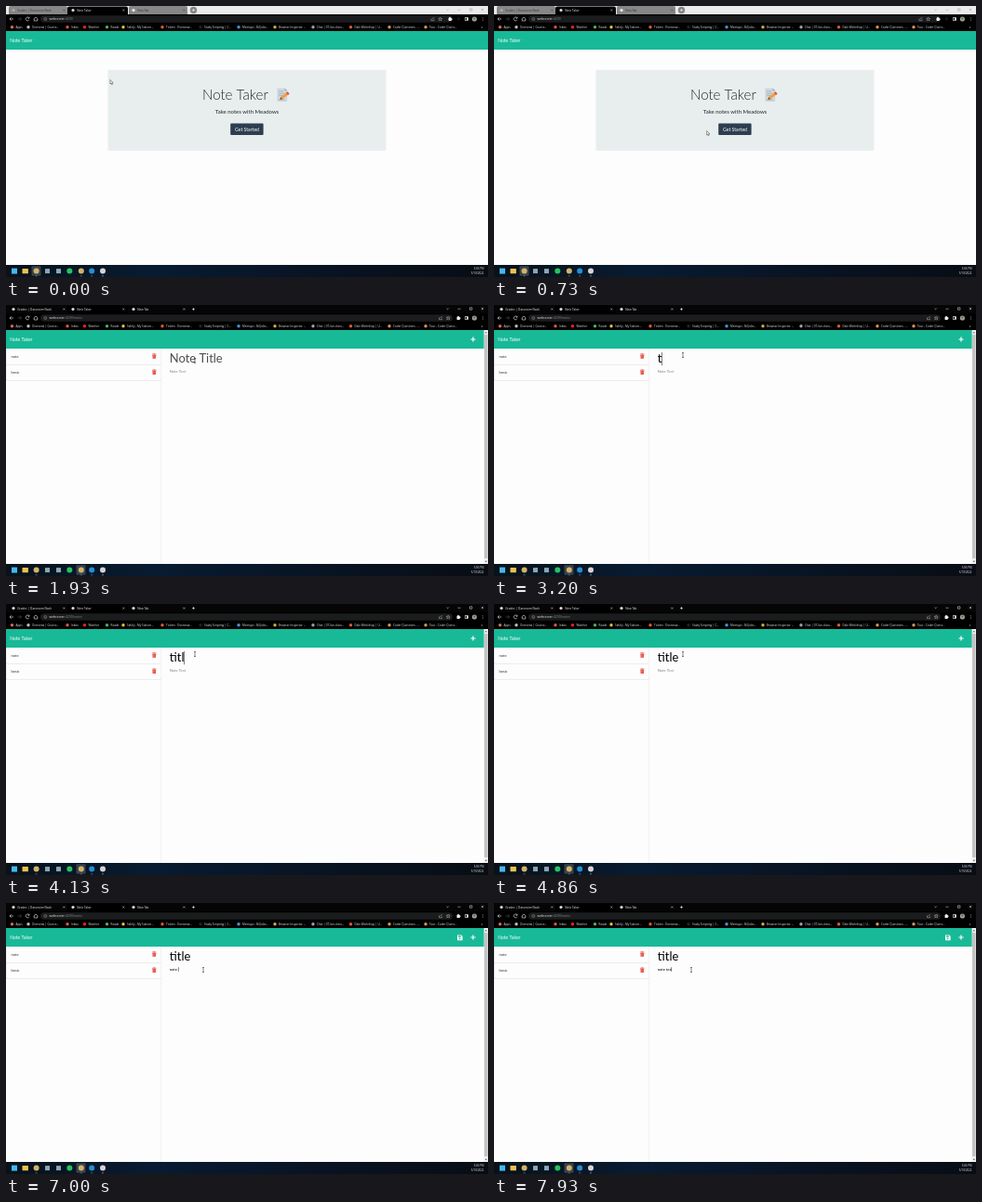
Animation, 518 px wide and 292 px high, one loop 8000 ms. Source, as an HTML page with a canvas:

```html
<!DOCTYPE html>
<html lang="en">
<head>
<meta charset="utf-8">
<title>Note Taker</title>
<style>
html, body { margin: 0; width: 100%; height: 100%; overflow: hidden; background: #fdfdfd; }
canvas { display: block; width: 518px; height: 292px; }
</style>
</head>
<body>
<canvas></canvas>
<script>
const W = 518, H = 292, LOOP = 8000;
const canvas = document.querySelector('canvas');
const ctx = canvas.getContext('2d');
const scale = window.devicePixelRatio || 1;
canvas.width = W * scale;
canvas.height = H * scale;

const ACTIVATE = 1130, NAVIGATE = 1260;
const TITLE_FOCUS = 2660, TEXT_FOCUS = 5860;
const titleKeys = { text: 'title', times: [3130, 3460, 3700, 3930, 4330] };
const bodyKeys = { text: 'note tex', times: [6600, 6660, 6800, 6860, 7000, 7060, 7600, 7730] };

// Pointer path: time, x, y
const path = [
  [0, 112, 79.5], [60, 112, 79.5], [400, 165, 112], [730, 228.5, 134.5], [860, 245, 135],
  [1130, 252, 133], [1300, 247, 122], [1600, 218, 82], [1800, 205, 64], [1930, 203, 60],
  [2600, 203, 54], [5000, 203, 54], [5860, 212, 72], [LOOP, 212, 72]
];

const lato = (size, weight = 400) => `${weight} ${size}px Lato, sans-serif`;
const ui = size => `${size}px "Open Sans", sans-serif`;

function rect(x, y, w, h, color, radius = 0) {
  ctx.fillStyle = color;
  ctx.beginPath();
  ctx.roundRect(x, y, w, h, radius);
  ctx.fill();
}
function dot(x, y, r, color) {
  ctx.fillStyle = color;
  ctx.beginPath();
  ctx.arc(x, y, r, 0, 7);
  ctx.fill();
}
function stroke(d, color, width = 0.6) {
  ctx.strokeStyle = color;
  ctx.lineWidth = width;
  ctx.stroke(new Path2D(d));
}
function fill(d, color) {
  ctx.fillStyle = color;
  ctx.fill(new Path2D(d));
}
function text(string, x, y, font, color, align = 'left') {
  ctx.font = font;
  ctx.fillStyle = color;
  ctx.textAlign = align;
  ctx.fillText(string, x, y);
}
function at(x, y, draw) {
  ctx.save();
  ctx.translate(x, y);
  draw();
  ctx.restore();
}
const cross = (x, y, r, color) =>
  stroke(`M${x - r} ${y - r}l${2 * r} ${2 * r}m0 ${-2 * r}l${-2 * r} ${2 * r}`, color, 0.5);
const plus = (x, y, r, color, width) =>
  stroke(`M${x - r} ${y}h${2 * r}M${x} ${y - r}v${2 * r}`, color, width);

function drawTabs(active) {
  rect(0, 0, W, 10, active ? '#050505' : '#ebebeb');
  const ink = active ? '#eee' : '#333';
  const tabs = [['Grades | Classroom Nook', 3], ['Note Taker', 67], ['New Tab', 132]];
  tabs.forEach(([label, x], i) => {
    const current = i === 1;
    if (current) rect(x - 1, 0.5, 65, 9.5, '#000', [2, 2, 0, 0]);
    else if (!active) rect(x, 0, 63, 9, '#868686', [2, 2, 0, 0]);
    const color = current ? '#eee' : ink;
    dot(x + 5, 4.5, 1.6, active || current ? '#ddd' : i ? '#eee' : '#aaa');
    text(label, x + 9.3, 5.7, ui(3.05), color);
    cross(x + 59.3, 4.5, 0.9, color);
  });
  if (!active) dot(201.5, 4.5, 3.7, '#868686');
  plus(201.5, 4.5, 1.4, '#fff', 0.6);
  const control = active ? '#eee' : '#999';
  stroke('M473.5 3.5l1.2 1.2l1.2 -1.2M485.5 4.2h3M498.5 2.8h2.4v2.4h-2.4z', control, 0.5);
  cross(512, 4, 1.2, control);
}

function drawToolbar(active, notes) {
  rect(0, 9, W, 18, '#000');
  rect(37, 10.3, 443, 7.4, '#1b1c1e', 3.7);
  stroke('M8 14h-4m1.7 -1.7l-1.7 1.7l1.7 1.7', '#eee');
  stroke('M12.5 14h4m-1.7 -1.7l1.7 1.7l-1.7 1.7', '#555');
  stroke('M24.7 13a1.9 1.9 0 1 0 .1 1.8M25 11.7v1.5h-1.5', '#eee');
  stroke('M29.6 14l2.4 -2l2.4 2M30.3 14v2h3.4v-2', '#eee');
  stroke('M43.8 14a1.5 1.5 0 1 0 -3 0a1.5 1.5 0 1 0 3 0M42.3 13.7v1', '#bbb', 0.4);
  const host = 'webserver';
  text(host, 46.5, 15.3, ui(3.4), '#eee');
  const hostWidth = ctx.measureText(host).width;
  text(notes ? ':4200/notes' : ':4200', 46.5 + hostWidth, 15.3, ui(3.4), '#888');

  const shift = active ? 8.5 : 0;
  stroke(`M${457 + shift} 13.5v2.2h3v-1.3M${458 + shift} 14.3q.4 -1.5 2.4 -1.7`, '#bbb', 0.5);
  at(466.7 + shift, 14, () =>
    stroke('M0 -1.9l.6 1.3h1.4l-1.1 .9l.4 1.5l-1.3 -.8l-1.3 .8l.4 -1.5l-1.1 -.9h1.4z', '#ccc', 0.45));
  const puzzleX = active ? 484.5 : 475.5;
  rect(puzzleX, 12.7, 3.3, 3.3, '#eee', 0.4);
  dot(puzzleX + 1.5, 12.6, 0.8, '#eee');
  dot(puzzleX + 3.4, 14.3, 0.8, '#eee');
  if (!active) stroke('M485 13h3m-3 1.5h3', '#555', 0.4);
  rect(493, 12.2, 3.8, 3.6, '#eee', 0.4);
  rect(493.6, 12.9, 1.5, 2.3, '#000');
  dot(503.4, 14, 2.6, '#9aa394');
  dot(503.4, 13.4, 1, '#53584f');
  for (const y of [12.4, 14, 15.6]) dot(512.2, y, 0.4, '#eee');
}

function drawBookmarks() {
  const items = [
    ['Apps', 10.5, '#d86a55'], ['Overview | Course...', 28, '#bbb'], ['Inbox', 70, '#e35244'],
    ['Watcher', 88.5, '#f02020'], ['Roads', 112.5, '#54ad66'], ['Safely - My Subscri...', 130, '#e8be35'],
    ['Tickets · Overview...', 172, '#e2572f'], ['Study Scripting | C...', 213, '#222'],
    ['Meetups - B4 Jobs...', 254, '#4e91dc'], ['Browser Inspector ...', 293, '#d6a747'],
    ['Chat | 07-live-class...', 334, '#a997ad'], ['Dale Workshop | U...', 374.5, '#e2572f'],
    ['Coder Questions - ...', 416, '#d99256'], ['Tour - Coder Quest...', 455, '#d99256']
  ];
  for (const [label, x, color] of items) {
    dot(x - 4, 22.8, 1.7, color);
    text(label, x, 24, ui(3.05), '#e4e4e4');
  }
  text('»', 510.5, 24, ui(4), '#eee');
}

function drawHeader(notes, canSave) {
  rect(0, 27, W, 20, '#18b997');
  text('Note Taker', 4.2, 39.1, lato(5.06), '#fff');
  if (!notes) return;
  plus(502, 37, 2.6, '#fff', 1.2);
  if (canSave) {
    fill('M485 34.5h4.3l1.3 1.3v4.4h-5.6z', '#fff');
    rect(486, 35.2, 2.8, 1.5, '#18b997');
    dot(487.8, 38.4, 0.8, '#18b997');
  }
}

function drawMemo() {
  fill('M291.3 88.5h8.2l2.8 2.8v11.6h-11z', '#cfd8df');
  fill('M299.5 88.5v2.8h2.8z', '#9eacb7');
  stroke('M293 92h5M293 94.3h6.5M293 96.6h5M293 101h6.5', '#8f9ba5', 0.6);
  stroke('M296.2 99.2l6 -4.7', '#f2a13d', 3.2);
  stroke('M302 94.7l1.7 -1.3', '#e14d4d', 3.2);
  fill('M294.3 100.7l.9 -2.8l2 2.6z', '#6b4a32');
}

function drawHome(t) {
  rect(109.5, 68.8, 299, 87, '#e8eeed');
  text('Note Taker', 211, 100.8, lato(15.1, 300), '#212529');
  drawMemo();
  text('Take notes with Meadows', 259, 116.4, lato(6), '#212529', 'center');
  rect(241.2, 126.4, 35.4, 12.6, t > 950 ? '#1e2b37' : '#2c3e50', 1);
  text('Get Started', 259, 134.6, lato(5.15), '#fff', 'center');
}

function drawTrash(x, y) {
  rect(x, y, 4.4, 0.8, '#e74c3c');
  rect(x + 1.4, y - 0.5, 1.6, 0.6, '#e74c3c');
  rect(x + 0.4, y + 1.2, 3.6, 4, '#e74c3c', 0.4);
  stroke(`M${x + 1.5} ${y + 1.8}v2.8m1.4 -2.8v2.8`, '#f7b8b1', 0.35);
}

// An editable field with placeholder and a caret that blinks since the last key.
function drawField(t, keys, x, baseline, size, placeholder, hint, focus, blur) {
  const typed = keys.times.filter(time => time <= t);
  const value = keys.text.slice(0, typed.length);
  text(value || placeholder, x, baseline, lato(size), value ? '#000' : hint);
  if (t < focus || t >= blur) return;
  const since = t - Math.max(focus, ...typed);
  if (since % 1000 < 500) {
    const caretX = x + (value ? ctx.measureText(value).width : 0);
    rect(caretX, baseline - size * 0.86, 0.5, size * 1.1, '#000');
  }
}

function drawNotes(t) {
  ['note', 'basic'].forEach((name, i) => {
    const y = 47 + i * 17.2;
    text(name, 5.6, y + 10.1, lato(4.05), '#333');
    drawTrash(157.1, y + 5.6);
    rect(0, y + 17, 167, 0.5, '#dcdcdc');
  });
  rect(0, 47, 0.4, 34.5, '#dcdcdc');
  rect(166.6, 47, 0.5, 232, '#e6e6e6');
  drawField(t, titleKeys, 175.8, 62.2, 12.95, 'Note Title', '#4d4d4d', TITLE_FOCUS, TEXT_FOCUS);
  drawField(t, bodyKeys, 175.8, 72.8, 4.05, 'Note Text', '#858585', TEXT_FOCUS, LOOP);
  rect(513.6, 27, 4.4, 252, '#f1f1f1');
  rect(514.1, 32, 3.4, 241, '#c1c1c1');
  fill('M514.6 30.3h2.4l-1.2 -1.5z', '#555');
  fill('M514.6 275.7h2.4l-1.2 1.5z', '#555');
}

function drawTaskbar(active) {
  const shade = ctx.createLinearGradient(0, 0, W, 0);
  shade.addColorStop(0, '#08121b');
  shade.addColorStop(0.3, '#081b30');
  shade.addColorStop(0.5, '#08172a');
  shade.addColorStop(1, '#080d14');
  rect(0, 279, W, 13, shade);
  rect(active ? 75.5 : 27.5, 280.3, 10, 10.4, '#39434d', 1);
  rect(6, 282.6, 6, 6, '#45b8ee');
  rect(17.5, 283, 6.4, 5.2, '#edc34f', 0.5);
  const marks = [[32.6, '#d4b268'], [68.3, '#25c45f'], [80.8, '#d4b268'], [92.2, '#238fd8'], [104, '#d9d2d5']];
  for (const [x, color] of marks) dot(x, 285.6, 3, color);
  for (const x of [44.5, 56.5]) rect(x - 2.5, 283.1, 5, 5, '#8aa7b5');
  for (const x of [32.6, 80.8, 92.2, 104]) rect(x - 1, 290.6, 2, 0.6, '#8b98a4');
  text('5:06 PM', 513.5, 284.3, ui(2.9), '#eee', 'right');
  text('5/10/2022', 513.5, 289, ui(2.9), '#eee', 'right');
}

function pointerAt(t) {
  const i = Math.max(1, path.findIndex(point => point[0] >= t));
  const [t0, x0, y0] = path[i - 1], [t1, x1, y1] = path[i];
  const k = (t - t0) / (t1 - t0);
  return [x0 + (x1 - x0) * k, y0 + (y1 - y0) * k];
}

function drawPointer(t, notes) {
  const [x, y] = pointerAt(t);
  const overField = notes && x > 175 && y < 95;
  const overButton = !notes && x > 241 && x < 277 && y > 126 && y < 139;
  at(x, y, () => {
    if (overField) {
      stroke('M-1 -2.5h2M0 -2.5v5M-1 2.5h2', '#222', 0.55);
    } else if (overButton) {
      fill('M-.5 0h1v2.2l2 .6v2l-.7 1.4h-2.5l-1.7 -2.4l.6 -.4l1.3 .9z', '#fff');
      stroke('M-.5 0h1v2.2l2 .6v2l-.7 1.4h-2.5l-1.7 -2.4l.6 -.4l1.3 .9z', '#222', 0.3);
    } else {
      const arrow = 'M0 0v4.5l1 -.9l.7 1.7l.8 -.4l-.7 -1.6h1.4z';
      fill(arrow, '#fff');
      stroke(arrow, '#222', 0.45);
    }
  });
}

function draw(t) {
  const active = t >= ACTIVATE, notes = t >= NAVIGATE;
  ctx.setTransform(scale, 0, 0, scale, 0, 0);
  rect(0, 0, W, H, '#fdfdfd');
  drawTabs(active);
  drawToolbar(active, notes);
  drawBookmarks();
  drawHeader(notes, t >= bodyKeys.times[0]);
  if (notes) drawNotes(t);
  else drawHome(t);
  drawTaskbar(active);
  drawPointer(t, notes);
}

const start = performance.now();
function frame() {
  draw((performance.now() - start) % LOOP);
  requestAnimationFrame(frame);
}
frame();
</script>
</body>
</html>
```
